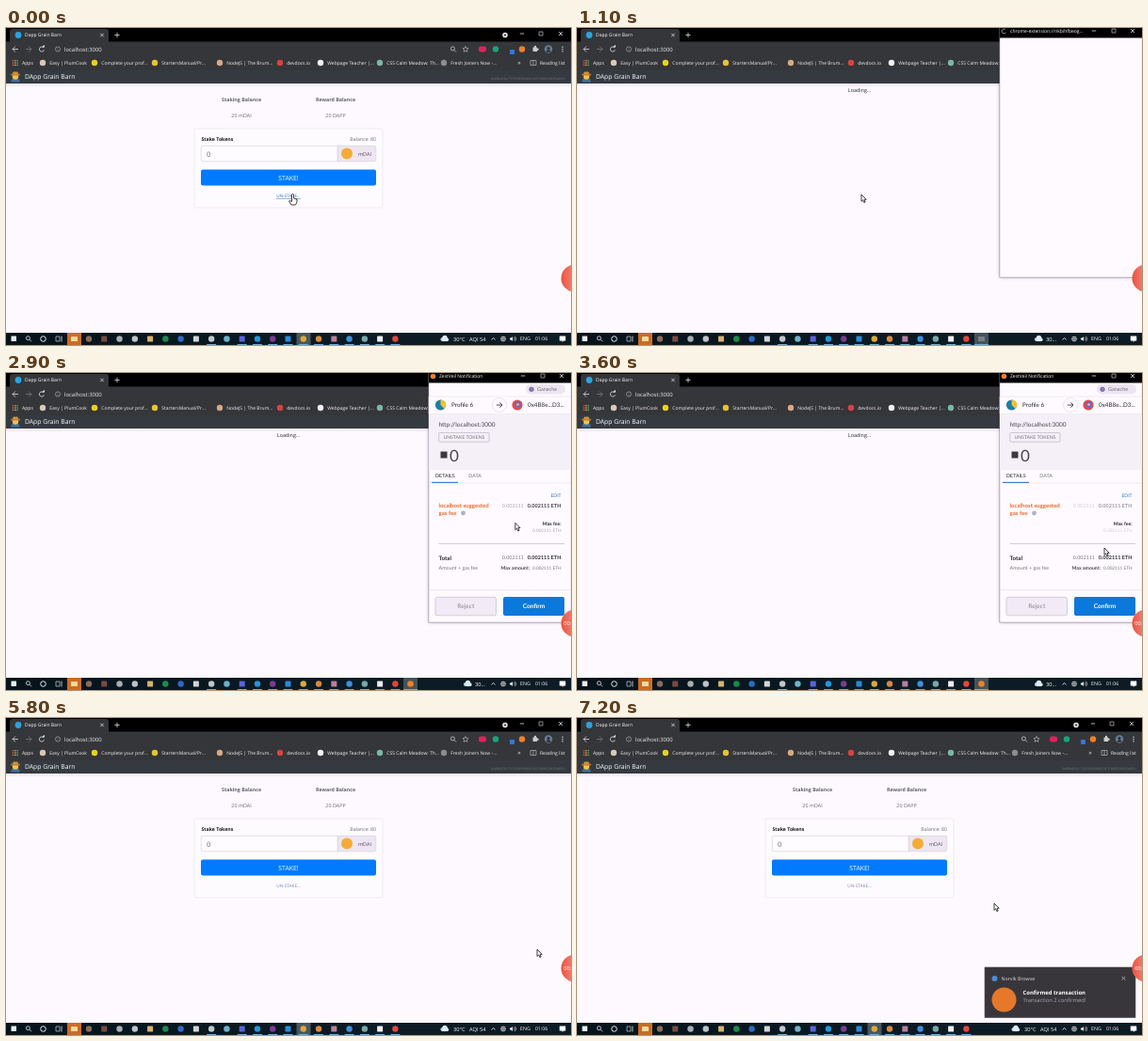
These frames come from a looping animation (600 px wide and 337 px high, 8000 ms). An HTML page with a canvas:

```html
<!DOCTYPE html>
<html lang="en">
<head>
<meta charset="utf-8">
<title>Staking demo</title>
<style>
html, body { margin: 0; width: 100%; height: 100%; overflow: hidden; background: #fdf9ff; }
canvas { display: block; width: 600px; height: 337px; }
</style>
</head>
<body>
<canvas id="stage"></canvas>
<script>
const canvas = document.getElementById('stage');
const ctx = canvas.getContext('2d');
const dpr = window.devicePixelRatio || 1;
canvas.width = 600 * dpr;
canvas.height = 337 * dpr;
ctx.textRendering = 'geometricPrecision';

const LOOP = 8000, STEP = 100;
const SANS = '"Open Sans", "Noto Sans", sans-serif';
const ROUND = 'Lato, "Open Sans", sans-serif';
const ORANGE = '#ee8128', PAGE = '#fdf9ff', BAR = '#35363a';
let family = SANS;

// ---------- drawing helpers ----------
function text(str, x, y, size, color, align = 'left', weight = 400) {
  ctx.font = `${weight} ${size}px ${family}`;
  ctx.fillStyle = color;
  ctx.textAlign = align;
  ctx.textBaseline = 'alphabetic';
  ctx.fillText(str, x, y + size * 0.36);
}
function box(x, y, w, h, fill, stroke, radius = 0) {
  ctx.beginPath();
  ctx.roundRect(x, y, w, h, radius);
  if (fill) { ctx.fillStyle = fill; ctx.fill(); }
  if (stroke) { ctx.strokeStyle = stroke; ctx.lineWidth = 0.6; ctx.stroke(); }
}
function dot(x, y, r, fill) {
  ctx.beginPath();
  ctx.arc(x, y, r, 0, Math.PI * 2);
  ctx.fillStyle = fill;
  ctx.fill();
}
function arc(x, y, r, from, to, color, width = 0.8) {
  ctx.beginPath();
  ctx.arc(x, y, r, from, to);
  ctx.strokeStyle = color;
  ctx.lineWidth = width;
  ctx.stroke();
}
const ring = (x, y, r, color, width) => arc(x, y, r, 0, Math.PI * 2, color, width);
function path(d, x, y, stroke, fill, width = 0.8) {
  const p = new Path2D(d);
  ctx.save();
  ctx.translate(x, y);
  if (fill) { ctx.fillStyle = fill; ctx.fill(p); }
  if (stroke) { ctx.strokeStyle = stroke; ctx.lineWidth = width; ctx.stroke(p); }
  ctx.restore();
}
function gradient(x0, y0, x1, y1, from, to) {
  const g = ctx.createLinearGradient(x0, y0, x1, y1);
  g.addColorStop(0, from);
  g.addColorStop(1, to);
  return g;
}
const cross = (x, y, r, color) => path(`M${-r} ${-r}L${r} ${r}M${r} ${-r}L${-r} ${r}`, x, y, color);
const lens = (x, y, color) => { ring(x - 0.6, y - 0.6, 2, color); path('M1 1L3 3', x, y, color); };
function windowButtons(y, minX, maxX, closeX) {
  path('M-2.2 0H2.2', minX, y, '#ddd');
  box(maxX - 2, y - 2, 4, 4, null, '#ddd');
  cross(closeX, y, 2, '#ddd');
}
const clamp = v => Math.max(0, Math.min(1, v));
const easeOut = v => 1 - (1 - clamp(v)) ** 3;

// ---------- browser ----------
const bookmarks = [
  [39, '#d8c9b8', 'Easy | PlumCook'],
  [94, '#e8d21d', 'Complete your prof...'],
  [158, '#e6c32f', 'StartersManual/Pr...'],
  [227, '#d6a982', 'NodeJS | The Brum...'],
  [291, '#d9433f', 'devdocs.io'],
  [334, '#f2f2f2', 'Webpage Teacher |...'],
  [397, '#78b8a4', 'CSS Calm Meadow: Th...'],
  [465, '#8b8d90', 'Fresh Joiners Now -...']
];

function drawBrowser() {
  box(0, 0, 600, 15, '#000');
  box(4, 1, 105, 15, BAR, null, [3, 3, 0, 0]);
  box(0, 14.5, 600, 30.5, BAR);
  dot(13, 7.5, 3.4, '#2ba3df');
  text('Dapp Grain Barn', 20, 7.5, 5, '#fff');
  cross(102, 7.5, 1.7, '#ddd');
  path('M-2.6 0H2.6M0-2.6V2.6', 118, 7.5, '#ddd');
  dot(530, 7.5, 2.8, '#ddd');
  dot(530, 7.5, 1, '#222');
  windowButtons(6, 548, 568, 589);

  path('M3 0H-3M0-3L-3 0L0 3', 10, 22.5, '#ddd');
  path('M-3 0H3M0-3L3 0L0 3', 24, 22.5, '#77797c');
  arc(38, 22.5, 2.6, 0.3, 5.6, '#ddd');
  path('M0-1.6H3V-4.5Z', 38, 22.2, null, '#ddd');
  ring(55, 22.5, 2.6, '#bbb', 0.6);
  text('i', 55, 22.5, 4, '#bbb', 'center');
  text('localhost:3000', 62, 22.5, 5.9, '#eee');
  lens(475, 22.5, '#ccc');
  path('M0-3L.9-1L3-.8L1.4.6L1.9 2.8L0 1.7L-1.9 2.8L-1.4.6L-3-.8L-.9-1Z', 488, 22.5, '#ccc', null, 0.6);
  box(502, 19.5, 8, 6, '#dd245b', null, 2);
  dot(520, 22.5, 3.2, '#18a579');
  box(535, 23, 5, 5, '#3278dd', null, 1);
  dot(548, 22.5, 3.2, ORANGE);
  box(559.5, 20.5, 4.5, 4.5, '#ccc', null, 0.5);
  dot(562, 20, 1.2, '#ccc');
  dot(564.5, 22.8, 1.2, '#ccc');
  dot(576, 22.5, 4.2, '#637e97');
  dot(576, 21.6, 1.5, '#302d30');
  box(573.7, 23.3, 4.6, 2.5, '#302d30', null, [2, 2, 0, 0]);
  for (const dy of [-2.3, 0, 2.3]) dot(591, 22.5 + dy, 0.7, '#ddd');

  for (let i = 0; i < 9; i++)
    dot(7.5 + i % 3 * 2.3, 34.8 + Math.floor(i / 3) * 2.3, 0.8, ['#e95b4e', '#e8b04c', '#62ad70'][i % 3]);
  text('Apps', 17, 37, 5.1, '#f4f4f5');
  for (const [x, color, label] of bookmarks) {
    dot(x, 37, 3.2, color);
    text(label, x + 7.3, 37, 5, '#f4f4f5');
  }
  text('»', 545, 36.5, 7, '#ddd', 'center');
  box(557, 34.5, 6, 5, null, '#ccc');
  path('M0-2.5V2.5', 560, 37, '#ccc', null, 0.6);
  text('Reading list', 567, 37, 5, '#f4f4f5');
}

function drawPage(loading, linkActive) {
  box(0, 59, 600, 265, PAGE);
  box(0, 59, 600, 4, gradient(0, 59, 0, 63, '#ebe1ef', PAGE));
  box(0, 45, 600, 14, '#343a40');
  // farmer
  box(5.5, 53.5, 9, 4, '#3f6f9e', null, [3, 3, 0, 0]);
  dot(10, 51.5, 3.2, '#f5c24a');
  box(4.8, 48.8, 10.4, 1.6, '#b9772e', null, 1);
  box(7, 46.5, 6, 3, '#d29138', null, 1.5);
  text('DApp Grain Barn', 20, 52, 6.8, '#fff');
  text('0x4B8eD3a17C05f2E96b80A1d7C34f9E2065Da8B1c', 594, 53.5, 3.3, '#73787d', 'right');

  if (loading) {
    text('Loading...', 300, 66.5, 5.4, '#212529', 'center');
    return;
  }
  text('Staking Balance', 250, 76.5, 5.3, '#62606a', 'center', 700);
  text('Reward Balance', 350, 76.5, 5.3, '#62606a', 'center', 700);
  text('20 mDAI', 250, 93.3, 5.4, '#6c6973', 'center');
  text('20 DAPP', 350, 93.3, 5.4, '#6c6973', 'center');
  box(200, 107, 200, 84, '#fefbff', '#e7e1ea', 1.5);
  text('Stake Tokens', 207.5, 118.5, 5.2, '#17171a', 'left', 700);
  text('Balance: 80', 393, 118.5, 5.2, '#6c6973', 'right');
  box(207.3, 125.3, 145, 16.5, '#fffcff', '#cfc9d4', [2, 0, 0, 2]);
  text('0', 213, 134, 7.5, '#6d6b75');
  box(352.3, 125.3, 40.5, 16.5, '#eee5f2', '#cfc9d4', [0, 2, 2, 0]);
  dot(362, 133.6, 6, '#f5ac37');
  text('mDAI', 374, 134, 5.5, '#55525c');
  box(207, 150.5, 186, 17, '#007bff', null, 2);
  text('STAKE!', 300, 159.5, 6.9, '#fff', 'center');
  const link = linkActive ? '#3c6fbb' : '#7184b6';
  text('UN-STAKE...', 300, 178.5, 4.7, link, 'center');
  if (linkActive) box(287, 181, 26, 0.5, link);
}

// ---------- taskbar ----------
const taskIcons = ['#8c6a55', '#7b4a42', '#a9adb3', '#bfc3c8', '#d6b36b', '#1c8a4d', '#2c6bc4', '#d3d6d8',
  '#bfc6cc', '#6fb1c9', '#5a63dd', '#2296db', '#7a3c92', '#2d8ad8', '#d9a93a', '#d8893e', '#b77f9e',
  '#3f8fdc', '#77a9a6', '#f0eeee', '#e2463b'];

function drawTaskbar(t, popup) {
  box(0, 324, 600, 13, gradient(0, 0, 400, 0, '#05141c', '#0d1b24'));
  box(5.5, 327.5, 5.5, 5.5, '#e8eef2');
  lens(24, 330.3, '#e8eef2');
  ring(39.5, 330.5, 2.8, '#e8eef2', 1);
  box(53, 328, 4, 5, null, '#e8eef2');
  path('M0-3V3', 59, 330.5, '#e8eef2');
  box(65, 324, 15, 13, '#cb6c25');
  box(69, 328, 7, 5, '#f2d9a0', null, 0.5);
  if (!popup) box(308.5, 324, 15, 13, '#4a565d');
  taskIcons.forEach((color, i) => {
    const x = 88 + i * 16.27;
    if (i % 3 === 1) box(x - 3, 327.5, 6, 6, color, null, 0.5);
    else dot(x, 330.5, 3.2, color);
    if (i === 8 || i > 9) box(x - 5, 336, 10, 1, '#74aacb');
  });
  if (popup) {
    box(422, 324, 15, 13, '#44525a');
    if (t < 1700) box(426, 328, 7, 5, '#777f84');
    else dot(429.5, 330.5, 3.3, t < 2600 ? '#d9a93a' : ORANGE);
    box(422, 336, 15, 1, '#74aacb');
  }
  const cloud = popup ? 490 : 465.5;
  dot(cloud - 2, 331, 2.1, '#c3dcf0');
  dot(cloud + 0.5, 329.5, 2.7, '#dcebf7');
  dot(cloud + 2.7, 331.2, 1.9, '#dcebf7');
  box(cloud - 2, 331, 5, 2.1, '#dcebf7');
  if (popup) text('30...', 498, 330.5, 5.7, '#fff');
  else {
    text('30°C', 475, 330.5, 5.7, '#fff');
    text('AQI 54', 492, 330.5, 5.7, '#fff');
  }
  path('M-2 1L0-1L2 1', 517.5, 330.5, '#fff');
  path('M-3 0H3M0-3V3M-2-2H2V2H-2Z', 528, 330.5, '#ddd', null, 0.7);
  path('M-3-1H-1.5L0-2.5V2.5L-1.5 1H-3Z', 538, 330.5, null, '#eee');
  arc(538, 330.5, 2, -0.9, 0.9, '#eee', 0.6);
  arc(538, 330.5, 3.6, -0.9, 0.9, '#eee', 0.6);
  text('ENG', 546, 330.5, 5.3, '#fff');
  text('01:06', 568.5, 330.5, 5.2, '#fff', 'center');
  path('M-3-2.5H3V2H1L0 3.2V2H-3Z', 591, 330.3, '#fff', '#fff', 0.5);
}

// ---------- wallet popup ----------
function drawTransaction(t) {
  family = ROUND;
  const ink = '#29282d', gray = '#77747d', pale = '#aaa5b0', blue = '#2677d3';
  const fee = '0.002111', feeEth = fee + ' ETH';
  box(552, 12, 42, 10.5, '#eee5f3', null, 5);
  dot(558, 17.3, 2.6, '#7b6ca6');
  text('?', 558, 17.3, 3.8, '#fff', 'center');
  text('Ganache', 564, 17.3, 5.5, '#6a6872');
  box(449, 25, 151, 18.5, '#fefaff', '#e4dde8');
  dot(461.5, 34, 5.6, '#1d7fa6');
  path('M0 0V-5.6A5.6 5.6 0 0 1 4 4Z', 461.5, 34, null, '#f2c230');
  text('Profile 6', 473, 34.2, 6.3, ink);
  box(516, 25.3, 16, 18, '#fefaff');
  ring(524, 34, 7.6, '#ded7e2', 0.6);
  path('M-3.3 0H3M.4-2.6L3 0L.4 2.6', 524, 34, ink);
  dot(543, 34, 5.6, '#e54a4a');
  dot(543.5, 33.5, 3, '#4d6ed0');
  dot(543.5, 33.5, 1.6, '#f0a0b0');
  text('0x4B8e...D3...', 554, 34.2, 6.3, ink);
  box(449, 43.5, 151, 59.5, '#f5eff8');
  text('http://localhost:3000', 459.5, 54.8, 6.5, '#4a4850');
  box(459.7, 63.5, 53.3, 9.7, null, '#b3adb8', 1);
  text('UNSTAKE TOKENS', 486.4, 68.5, 5.1, gray, 'center');
  box(461.5, 83.5, 7, 7, '#3b3a3f');
  text('0', 471, 87.5, 17, '#48464d');
  text('DETAILS', 466.3, 109.3, 5.3, ink, 'center');
  text('DATA', 498, 109.3, 5.3, gray, 'center');
  box(449, 116.7, 151, 0.5, '#ddd6e2');
  box(452, 115.8, 28, 1.1, blue);

  text('EDIT', 589.5, 130.5, 5, blue, 'right');
  text('localhost suggested', 459.5, 140.7, 6.1, '#ef6a2c', 'left', 700);
  text('gas fee', 459.5, 149, 6.1, '#ef6a2c', 'left', 700);
  dot(485.5, 149, 2.4, '#b5afc0');
  text('Max fee:', 589.5, 160, 5.1, ink, 'right', 700);
  const alpha = ctx.globalAlpha;
  if (t >= 3500 && t <= 4000) ctx.globalAlpha = alpha * (0.75 - 0.25 * Math.cos((t - 3600) / 400 * Math.PI));
  text(fee, 550, 140.7, 5.4, pale, 'right');
  text(feeEth, 589.5, 140.7, 5.5, '#3d3a42', 'right', 700);
  text(feeEth, 589.5, 167, 4.7, pale, 'right');
  ctx.globalAlpha = alpha;
  box(459.5, 181, 133.5, 0.7, '#c3bdc8');
  text('Total', 459.5, 196.3, 6.2, ink, 'left', 700);
  text(fee, 550, 196.3, 5.4, gray, 'right');
  text(feeEth, 589.5, 196.3, 5.5, ink, 'right', 700);
  text('Amount + gas fee', 459.5, 207.5, 5.4, gray);
  text('Max amount:', 556, 207.5, 5.2, '#48464d', 'right', 700);
  text(feeEth, 589.5, 207.5, 4.7, gray, 'right');
  box(449, 230, 151, 0.5, '#ddd6e2');
  box(456, 238.3, 64.5, 19.5, '#f2eaf6', '#bbb4c2', 2);
  text('Reject', 488.3, 248, 6.6, '#8a8790', 'center');
  box(528, 238, 65, 20, t >= 4500 ? '#0a67b8' : '#0b78dc', null, 2);
  text('Confirm', 560.5, 248, 6.6, '#fff', 'center', 700);
  family = SANS;
}

function drawBusy(t) {
  box(449, 10.5, 151, 254.5, 'rgba(254,249,255,.8)');
  const alpha = ctx.globalAlpha;
  for (let i = 0; i < 10; i++) {
    ctx.save();
    ctx.translate(524.5, 107);
    ctx.rotate((i + t / 100) * Math.PI / 5);
    ctx.globalAlpha = alpha * (0.15 + i * 0.09);
    box(6, -1.7, 7, 3.4, '#f39a35', null, 1.7);
    ctx.restore();
  }
}

function drawPopup(t) {
  const opening = t < 900 ? [0.87, 0.18] : t < 1000 ? [0.98, 0.6] : [1, 1];
  const closing = t < 5100 ? [1, 1] : t < 5200 ? [0.96, 0.6] : [0.92, 0.2];
  const [scale, alpha] = t < 3000 ? opening : closing;
  ctx.save();
  ctx.globalAlpha = alpha;
  ctx.translate(524.5, 132);
  ctx.scale(scale, scale);
  ctx.translate(-524.5, -132);
  // a shadow would show through the half-transparent window
  if (alpha === 1) {
    ctx.shadowColor = 'rgba(40,20,50,.3)';
    ctx.shadowBlur = 4 * dpr;
  }
  box(449, -3, 151, 268, t < 1100 ? '#050505' : '#fefaff');
  ctx.shadowColor = 'transparent';
  if (alpha === 1) box(448.8, -3, 151.5, 268.2, null, '#8b8690');
  box(449, -3, 151, 13.5, '#000');
  const early = t < 1700;
  if (t < 2600) arc(453.5, 3.5, 2.4, t / 160, t / 160 + 4.6, '#ccc', 0.7);
  else dot(453.5, 3.5, 2.8, ORANGE);
  if (t >= 900)
    text(early ? 'chrome-extension://nkbihfbeog...' : 'ZestVeil Notification', 460, 3.5, 5, '#fff');
  windowButtons(3, 549, 570, 590);
  if (!early && t < 2600) {
    dot(525, 115, 33, ORANGE);
    arc(524.3, 165, 5, t / 160, t / 160 + 4.9, '#ee8f3c', 1.4);
  }
  if (t >= 2600) drawTransaction(t);
  if (t >= 4700) drawBusy(t);
  ctx.restore();
}

// ---------- overlays ----------
function drawToast(t) {
  ctx.save();
  ctx.translate(167 * (1 - easeOut((t - 6000) / 500)), 0);
  box(433, 265, 160, 53.5, '#39363b', '#4a474d');
  dot(443.5, 277, 3, '#4c8bd8');
  text('Norvik Browse', 450.5, 277, 5.3, '#dedbe0');
  cross(580.5, 276.7, 1.9, '#bbb');
  dot(453.5, 299.5, 13, '#e7782b');
  text('Confirmed transaction', 473.5, 291.5, 5.9, '#fff', 'left', 700);
  text('Transaction 2 confirmed!', 473.5, 300.2, 5.8, '#aaa7ad');
  ctx.restore();
}

function drawRecorder(t) {
  dot(604, 266, 14.5, gradient(589, 0, 600, 0, '#e9513f', '#f0796a'));
  if (t >= 1700) text('00:', 592.3, 266.3, 5.6, '#fff');
}

const cursorTrack = [[0, 302, 177], [1600, 302, 177], [1800, 537, 154], [2800, 537, 154], [3400, 560, 186],
  [4100, 560, 186], [4500, 564, 246], [6000, 564, 246], [6600, 443, 197], [LOOP, 443, 197]];

function drawCursor(t) {
  if (t < 300) {
    path('M-1 0Q0-1 1 0V4L4.5 5V8L3 11H-1.5L-4 7Q-3.5 5.5-1 7.5Z', 304.5, 177, '#111', '#fff', 0.8);
    return;
  }
  const i = cursorTrack.findIndex(k => k[0] > t);
  const [t0, x0, y0] = cursorTrack[i - 1], [t1, x1, y1] = cursorTrack[i];
  const p = (t - t0) / (t1 - t0);
  path('M0 0V7.4L1.7 5.8L2.9 8.6L4.2 8L3 5.3H5.2Z', x0 + (x1 - x0) * p, y0 + (y1 - y0) * p, '#111', '#fff', 0.8);
}

function draw(now) {
  const t = Math.floor(now % LOOP / STEP) * STEP;
  const popup = t >= 700 && t < 5300;
  ctx.setTransform(dpr, 0, 0, dpr, 0, 0);
  drawBrowser();
  drawPage(t >= 100 && t < 5400, t < 100);
  if (popup) drawPopup(t);
  if (t >= 6100) drawToast(t);
  drawTaskbar(t, popup);
  drawRecorder(t);
  drawCursor(t);
}

const start = performance.now();
function tick() {
  draw(performance.now() - start);
  requestAnimationFrame(tick);
}
tick();
</script>
</body>
</html>
```
